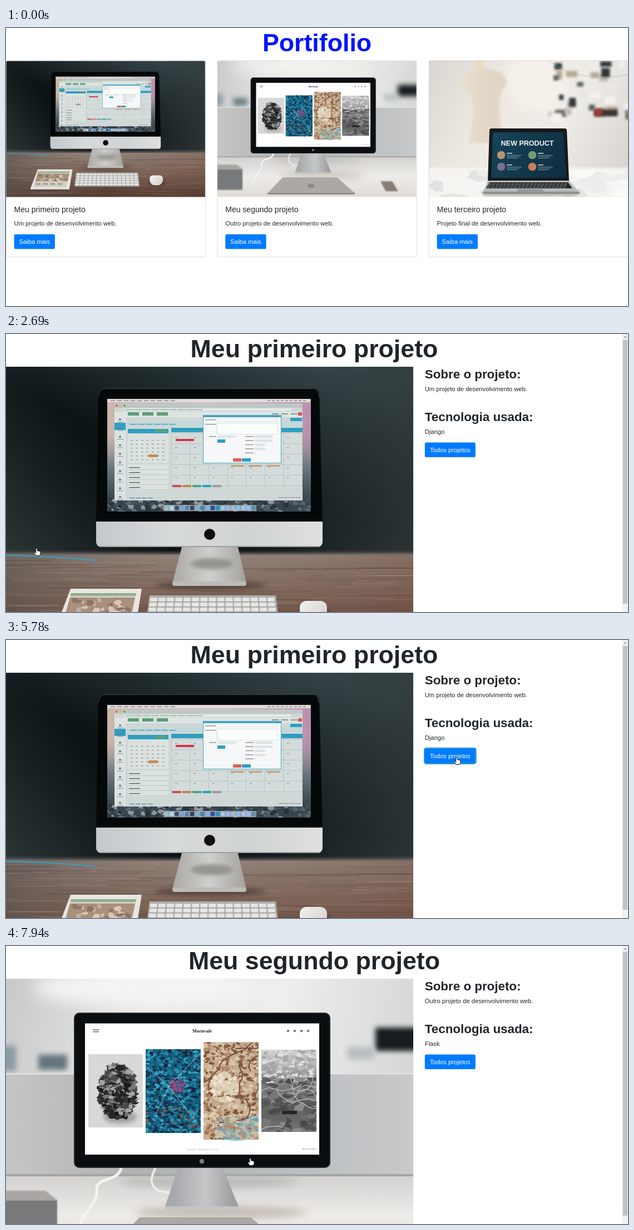
Recreate the animation shown at these times as an HTML page with a canvas. Size 1118 px wide and 501 px high, loop 8 s.

```html
<!DOCTYPE html>
<html lang="pt">
<head>
<meta charset="utf-8">
<title>Portifolio</title>
<style>
html, body { margin: 0; width: 100%; height: 100%; overflow: hidden; background: #fff; }
canvas { display: block; width: 100vw; height: 100vh; }
</style>
</head>
<body>
<canvas id="stage" width="1118" height="501"></canvas>
<script>
const W = 1118, H = 501, LOOP = 8000;
const SX = 0.69875, SY = 0.6955; // page pixels to stage pixels
const SANS = '"Liberation Sans", Arial, sans-serif';
const SERIF = '"Liberation Serif", Times, serif';
const INK = '#212529', BLUE = '#007bff', TEAL = '#2f9fc0';
const stage = document.getElementById('stage').getContext('2d');
let g = stage;

// ---- drawing helpers ----
function rect(x, y, w, h, c) { g.fillStyle = c; g.fillRect(x, y, w, h); }
function round(x, y, w, h, r, c) {
  g.beginPath(); g.roundRect(x, y, w, h, r); g.fillStyle = c; g.fill();
}
function oval(x, y, rx, ry, c) {
  g.beginPath(); g.ellipse(x, y, rx, ry, 0, 0, 7); g.fillStyle = c; g.fill();
}
// four-sided shape with a level top and bottom edge
function slab(x0, y0, w0, x1, y1, w1, c) {
  g.beginPath();
  g.moveTo(x0, y0); g.lineTo(x0 + w0, y0); g.lineTo(x1 + w1, y1); g.lineTo(x1, y1);
  g.closePath(); g.fillStyle = c; g.fill();
}
function curve(d, c, w) { g.strokeStyle = c; g.lineWidth = w; g.stroke(new Path2D(d)); }
function grad(x0, y0, x1, y1, ...colors) {
  const f = g.createLinearGradient(x0, y0, x1, y1);
  colors.forEach((c, i) => f.addColorStop(i / (colors.length - 1), c));
  return f;
}
function text(s, x, y, size, { color = INK, bold = false, align = 'left', font = SANS } = {}) {
  g.save();
  g.translate(x, y); g.scale(SX, SY);
  g.font = `${bold ? 'bold ' : ''}${size}px ${font}`;
  g.textAlign = align; g.fillStyle = color; g.fillText(s, 0, 0);
  g.restore();
}
function random(seed) {
  return () => (seed = seed * 16807 % 2147483647) / 2147483647;
}
function soft(px, draw) {
  g.save(); g.filter = `blur(${px}px)`; draw(); g.restore();
}
function clipped(x, y, w, h, draw) {
  g.save(); g.beginPath(); g.rect(x, y, w, h); g.clip(); draw(); g.restore();
}
function dashes(x, y, n, w, gap, c, h = 1.2) {
  for (let i = 0; i < n; i++) rect(x + i * (w + gap), y, w, h, c);
}
// scattered angular flakes inside an ellipse or a box
function flakes(x, y, w, h, colors, n, size, seed, oval = false) {
  const r = random(seed);
  clipped(x, y, w, h, () => {
    for (let i = 0; i < n; i++) {
      const a = r() * 6.28, d = Math.sqrt(r());
      const cx = oval ? x + w / 2 * (1 + d * Math.cos(a) * 0.85) : x + r() * w;
      const cy = oval ? y + h / 2 * (1 + d * Math.sin(a) * 0.85) : y + r() * h;
      g.beginPath();
      for (let k = 0; k < 6; k++) {
        const len = size * (0.2 + r());
        g.lineTo(cx + Math.cos(k * 1.05) * len, cy + Math.sin(k * 1.05) * len * 0.7);
      }
      g.fillStyle = colors[Math.floor(r() * colors.length)]; g.fill();
    }
  });
}
// wandering veins across a box
function veins(x, y, w, h, color, n, width, seed) {
  const r = random(seed);
  clipped(x, y, w, h, () => {
    for (let i = 0; i < n; i++) {
      let a = r() * 6.28, px = x + r() * w, py = y + r() * h;
      g.beginPath(); g.moveTo(px, py);
      for (let k = 0; k < 14; k++) {
        a += (r() - 0.5) * 1.3;
        g.lineTo(px += Math.cos(a) * 9, py += Math.sin(a) * 9);
      }
      g.strokeStyle = color; g.lineWidth = width; g.stroke();
    }
  });
}

// ---- first photo: dark room, calendar on the screen ----
function monthGrid(x, y, cols, rows, dx, dy, c) {
  for (let j = 0; j < rows; j++) dashes(x, y + j * dy, cols, 3.5, dx - 3.5, c);
}
function dialog() {
  rect(354, 146, 141, 87, '#45a5bf');
  rect(355, 150, 139, 82, '#f5f7f8');
  for (const [y, h] of [[152, 5], [160, 21]]) {
    rect(379, y, 109, h, '#cdd6d8'); rect(380, y + 0.7, 107.5, h - 1.4, '#fbfcfc');
    rect(358, y + 2, 19, 1.3, '#888');
  }
  rect(365, 184, 13, 1.3, '#888'); rect(381, 183, 32, 4, '#dfe5e7');
  rect(380, 190, 14, 6, TEAL);
  for (let j = 0; j < 5; j++) {
    rect(430, 184 + j * 7.4, 15, 1.3, '#888');
    rect(447, 183 + j * 7.4, j < 2 ? 32 : j < 4 ? 19 : 2, 4, '#dbe2e4');
  }
  rect(408, 224, 15, 6, '#d9605a'); rect(424, 224, 16, 6, TEAL);
}
function calendarApp() {
  rect(182, 117, 366, 203, grad(182, 140, 548, 120, '#c9b7ab', '#cfc4bf', '#b98fb0'));
  rect(182, 180, 366, 140, grad(0, 180, 0, 300, '#8d8b8d00', '#6b7780', '#38434b'));
  flakes(182, 296, 366, 24, ['#2a343c', '#586670', '#44525c', '#8c969b'], 160, 7, 41);
  rect(182, 117, 365, 6, '#e3dadc');
  dashes(188, 119.5, 10, 8, 4, '#777');
  dashes(470, 119.5, 9, 5, 3, '#777');

  rect(195, 125, 338, 175, '#cfd8d6');
  rect(195, 125, 338, 8, '#bfc7c6');
  ['#e2544b', '#e3b23c', '#53b04a'].forEach((c, i) => oval(199 + i * 7, 129, 2, 2, c));
  rect(213, 134, 300, 4.5, '#e3e9e7');
  dashes(215, 135.7, 9, 14, 1.5, '#7fa487');
  rect(195, 140, 338, 10, '#dde4e1');
  dashes(219, 141, 3, 20, 6, '#5c9c7a', 6);
  dashes(478, 143, 3, 12, 5, '#8a9794', 2);
  rect(525, 141, 7, 6, '#d2574f');
  rect(195, 150, 20, 149, '#dbe2e0');
  rect(195, 160, 20, 13, TEAL);
  for (let y = 154; y < 295; y += 15.5) {
    oval(205, y, 2, 2, '#6c7b80'); rect(200, y + 4, 11, 1, '#8b9799');
  }
  rect(218, 158, 314, 8, '#c2d8dc');
  dashes(223, 162, 6, 12, 2, '#3f90aa');
  rect(511, 151, 21, 6, TEAL);

  rect(219, 171, 73, 8, TEAL);
  rect(268, 172, 20, 5, '#57a37a');
  rect(219, 179, 73, 53, '#dbe2df');
  rect(219, 235, 73, 47, '#dbe2df');
  monthGrid(224, 191, 7, 6, 9.5, 7, '#82908f');
  rect(256, 217, 17, 5, '#c98a55');
  for (let y = 240; y < 282; y += 9) {
    rect(221, y, 20, 1.3, '#4d5a5c'); rect(219, y + 4, 73, 0.7, '#b3bfbe');
  }
  rect(297, 169, 236, 8, TEAL);
  rect(297, 178, 236, 98, '#d3dcda');
  dashes(297, 178, 8, 0.8, 32.8, '#b3bfbe', 98);
  for (let y = 178; y < 277; y += 19) rect(297, y, 236, 0.8, '#b3bfbe');
  monthGrid(304, 186, 7, 5, 33.5, 18, '#87908f');
  rect(305, 189, 33, 4, '#d5334f');
  dashes(404, 236.5, 3, 24, 8, '#c09a70', 2.5);
  ['#d2475a', '#c9824a', '#4aa68c', TEAL, '#989d9e']
    .forEach((c, i) => rect(299 + i * 18, 272, 16, 4, c));
  dashes(222, 295, 4, 9, 2, '#4c7f92');
  dashes(490, 294, 4, 9, 1, '#8a9495');
  dialog();

  rect(283, 308, 167, 11, '#aab5bccc');
  const r = random(9);
  for (let x = 285; x < 445; x += 9.2)
    round(x, 309.5, 7.4, 8, 1.5, `hsl(${190 + r() * 40} ${20 + r() * 50}% ${25 + r() * 55}%)`);
}
function wall() {
  rect(0, 59, 732, 350, grad(440, 10, 310, 350, '#364447', '#212c2f', '#0d1416', '#0b1113'));
  rect(0, 59, 732, 350, grad(440, 250, 760, 420, '#2d353600', '#303839'));
  rect(0, 59, 732, 350, grad(0, 400, 190, 250, '#2c3536', '#2c353600'));
}
function desk() {
  soft(3, () => slab(-10, 395, 752, -10, 570, 752, '#877a73'));
  rect(0, 398, 732, 163, grad(0, 398, 0, 561, '#918279', '#7b6054', '#4c332b'));
  rect(0, 398, 732, 163, grad(0, 0, 732, 0, '#55504d99', '#8b726500', '#6d4c4066'));
  const r = random(17);
  for (let i = 0; i < 130; i++)
    rect(r() * 732 - 60, 402 + r() * 158, 60 + r() * 170, 0.7 + r() * 1.3,
      r() < 0.55 ? '#b9a19133' : '#3b241c33');
  curve('M0 399 Q80 400 162 408', '#36a0c8', 2);
}
function tablet() {
  slab(116, 459, 128, 88, 533, 144, '#e9e5e0');
  slab(117, 467, 117, 100, 525, 122, '#d3d0c7');
  slab(117, 467, 117, 115.5, 472, 118, '#8fb08d');
  slab(115, 475, 117, 107, 503, 119, '#a8907c');
  flakes(114, 475, 110, 28, ['#d8c8b5', '#8d7565', '#c2b09e'], 22, 9, 6);
  dashes(108, 510, 4, 18, 9, '#a9988a', 6);
}
function keyboard() {
  slab(258, 471, 227, 251, 522, 240, '#adacaa');
  for (let j = 0; j < 5; j++) {
    const step = (226 + j * 2.2) / 15;
    for (let i = 0; i < 15; i++)
      round(259 - j * 1.2 + i * step, 475 + j * 9, step - 2.2, 6.8, 1.5, '#e6e6e4');
  }
}
function photoDark() {
  wall();
  desk();
  soft(5, () => oval(368, 453, 100, 6, '#2a1d1999'));
  slab(316, 384, 101, 299, 449, 133, grad(300, 0, 432, 0, '#aaa9a6', '#cfcfcd', '#a3a19e'));
  round(299, 446, 133, 8, 4, '#bdbbb8');
  soft(3, () => oval(370, 414, 38, 10, '#96948f'));
  slab(166, 104, 397, 162, 342, 407, '#050809');
  round(166, 98, 397, 30, 10, '#050809');
  curve('M167 112 Q167 99 176 98.5 H552 Q562 99 562.5 113', '#3b4649', 1.2);
  calendarApp();
  round(162, 338, 407, 46, [0, 0, 9, 9], grad(162, 0, 569, 0, '#c3c8ca', '#d7dadb', '#cfd3d4', '#dfe0e0'));
  rect(168, 382, 395, 2, '#9ca0a2');
  oval(366, 361, 10, 10, '#0c0d0e');
  soft(4, () => slab(96, 530, 134, 240, 530, 260, '#1d110e66'));
  tablet();
  keyboard();
  soft(3, () => oval(555, 506, 28, 16, '#1d110e77'));
  round(528, 481, 49, 37, [12, 12, 20, 20], grad(528, 480, 560, 518, '#f3f2f0', '#d7d4d1'));
}

// ---- second photo: bright office, stone gallery on the screen ----
function gallery() {
  rect(148, 195, 98, 132, '#d8d8d8');
  soft(3, () => oval(205, 308, 30, 12, '#a2a2a2'));
  flakes(163, 204, 76, 116, ['#1a1a1a', '#333', '#4b4b4b', '#777', '#262626', '#a5a5a5'], 420, 8, 5, true);

  rect(251, 186, 99, 151, '#155e7c');
  flakes(251, 186, 99, 151, ['#123249', '#2691b4', '#0d4867', '#1f7699', '#1a2540', '#35a6c4'], 700, 5, 23);
  flakes(291, 236, 36, 30, ['#7b4d8c', '#a04e78', '#4d4c7a'], 70, 4, 3, true);
  flakes(251, 290, 99, 46, ['#895b47', '#303153', '#197293'], 50, 4, 8);
  curve('M252 217 L292 252 L350 328 M350 193 L294 250 L270 302', '#a2c2cb', 1);

  rect(355, 173, 99, 176, '#c4ab8f');
  flakes(355, 173, 99, 176, ['#dccdb4', '#93694e', '#b58b6b', '#d9c4a6', '#80563e', '#cdb89d'], 620, 6, 57);
  flakes(365, 222, 56, 64, ['#eee5d2', '#dfd3bd', '#d9c9af'], 110, 6, 7, true);
  flakes(376, 306, 78, 43, ['#8bb0b5', '#a69985', '#739faa', '#cbbda2'], 120, 6, 31);
  curve('M454 307 Q416 315 432 334 T401 349', '#9bc4cc', 3);
  veins(355, 173, 99, 176, '#754a37', 5, 2, 12);

  rect(459, 187, 99, 148, grad(0, 187, 0, 335, '#d5d5d5', '#8e8e8e', '#555', '#777'));
  flakes(459, 187, 99, 60, ['#d2d2d2', '#bbb', '#a5a5a5', '#e0e0e0'], 180, 6, 2);
  flakes(459, 237, 99, 98, ['#555', '#777', '#4a4a4a', '#8a8a8a', '#666'], 90, 12, 77);
  veins(459, 225, 99, 110, '#bdbdbd', 8, 1.3, 19);
  rect(496, 297, 27, 6, '#252525');
}
function office() {
  rect(0, 59, 732, 175, grad(0, 59, 732, 190, '#c8c9ca', '#e9e9e8', '#eeeeec', '#d6d7d7'));
  soft(14, () => oval(250, 75, 200, 34, '#f4f3f2'));
  soft(5, () => {
    rect(-8, 180, 26, 45, '#8c9aa1'); rect(58, 196, 52, 27, '#65757d');
    rect(664, 147, 80, 42, '#171c20'); rect(614, 182, 48, 22, '#b9bfc1');
  });
  rect(0, 231, 732, 186, grad(0, 0, 732, 0, '#c5c5c4', '#b1b2b2', '#b9bdbf', '#c7c9ca'));
  rect(0, 229, 732, 2.5, '#e1e2e2');
  rect(0, 411, 732, 150, grad(0, 411, 0, 561, '#d1d0ce', '#eeece8', '#dedbd5'));
  rect(0, 411, 732, 4, '#a3a4a4');
  soft(7, () => { oval(386, 480, 155, 12, '#c5beb7'); oval(365, 425, 160, 9, '#b6b6b4'); });
  soft(1.2, () => {
    slab(-9, 441, 80, -9, 458, 101, '#a9a6a3');
    slab(-9, 458, 101, -9, 535, 101, '#77797a');
    slab(600, 503, 44, 620, 540, 45, '#877d75');
  });
}
function photoBright() {
  office();
  curve('M207 400 C202 426 160 416 163 440 S138 480 130 510', '#f4f3f0', 5);
  curve('M269 400 C254 426 263 443 292 444 S353 440 353 400', '#eeedeb', 4);
  slab(310, 398, 79, 285, 472, 134, grad(300, 0, 417, 0, '#a6a9ab', '#c6c7c8', '#969899'));
  round(285, 469, 134, 7, 3, '#c4c4c3');
  slab(240, 489, 200, 184, 547, 322, '#aba8a6');
  rect(184, 546, 322, 6, '#8f8c8a');
  oval(344, 520, 13, 8, '#8c8987');
  round(122, 120, 461, 280, 10, '#0b0e10');
  g.strokeStyle = '#41484b'; g.lineWidth = 1;
  g.beginPath(); g.roundRect(123, 121, 459, 278, 9); g.stroke();
  rect(142, 139.5, 421, 236.5, '#fff');
  dashes(156, 150.5, 1, 11, 0, '#444'); dashes(156, 154, 1, 11, 0, '#444');
  text('Mornvale', 352.5, 156, 12, { bold: true, align: 'center', font: SERIF });
  for (let x = 507; x < 545; x += 12) oval(x, 153, 2.2, 2.2, '#777');
  gallery();
  text('Copyright © All rights reserved', 352, 368, 6.2, { color: '#aaa', align: 'center' });
  text('Stone Format', 545, 367, 6, { color: '#777', align: 'center' });
  oval(352, 388, 4.2, 4.2, '#777d80');
}

// ---- third photo: workshop with a laptop, drawn at card size ----
function mannequin() {
  soft(2, () => {
    const c = grad(815, 0, 900, 0, '#e9e0d3', '#e3d7c6', '#dfd4c5');
    rect(842, 59, 16, 24, '#e9dcc0');
    slab(826, 80, 66, 842, 152, 44, c);
    oval(858, 98, 41, 24, c);
    slab(842, 150, 44, 831, 207, 62, c);
  });
}
function pinboard() {
  const r = random(83), tones = ['#c4bbb1', '#b7a795', '#e9e7e4', '#59605f', '#f4f1ed', '#2f383d'];
  soft(2.2, () => {
    for (let i = 0; i < 30; i++)
      rect(975 + r() * 143, 60 + r() * 100, 7 + r() * 15, 7 + r() * 11, tones[i % 6]);
    rect(1057, 147, 42, 12, '#3b3432'); rect(1058, 146, 13, 12, '#a63b32');
  });
}
function laptop() {
  soft(2, () => slab(853, 295, 179, 860, 303, 162, '#b9b5b0'));
  slab(869, 184, 139, 866, 276, 146, '#15191b');
  round(869, 181, 139, 12, 4, '#15191b');
  slab(875, 188, 127, 872, 270, 135, grad(875, 188, 1007, 270, '#154459', '#0d2d3e'));
  text('NEW PRODUCT', 937, 212, 18, { color: '#f2f5f5', bold: true, align: 'center' });
  ['#ba936e', '#719d72', '#777097', '#c98059'].forEach((c, i) => {
    const x = 890 + i % 2 * 56, y = 229 + (i >> 1) * 21;
    oval(x, y, 7.3, 7.3, c);
    rect(x + 10, y - 4, 10, 1.5, '#d4dfe1');
    for (let k = 0; k < 3; k++) rect(x + 10, y + k * 2.6, 27 - k * 4, 0.8, '#8ea9b3');
  });
  slab(866, 275, 146, 857, 296, 174, '#b8bbbb');
  slab(869, 278, 141, 863, 289, 155, '#25292a');
  for (let j = 0; j < 4; j++) dashes(868 - j, 279.5 + j * 2.5, 21, 5, 1.8, '#818788', 1);
  slab(920, 290, 44, 918, 296, 50, '#999c9c');
  round(857, 295, 174, 4, 2, '#8d9090');
}
function photoLaptop() {
  rect(760, 59, 358, 246, grad(760, 59, 1118, 250, '#d9d6d1', '#eee9e2', '#eeece8', '#d8d4d0'));
  soft(10, () => oval(955, 95, 55, 55, '#f5f1ea'));
  mannequin();
  pinboard();
  curve('M975 59 Q1034 101 1118 84', '#b7b0a7', 0.7);
  soft(2, () => rect(750, 252, 380, 60, '#f5f4f1'));
  flakes(760, 256, 358, 48, ['#eceeed', '#f9f9f7', '#e3e4e1'], 26, 26, 14);
  laptop();
}

// ---- pages ----
const BTN1 = { x: 14.6, y: 371.8, w: 73.3 };
const BTN2 = { ...BTN1, x: 394.3 };
const BTN_ALL = { x: 752.8, y: 195.6, w: 91 };
const BTN_H = 38 * SY;

function button(label, { x, y, w }) {
  round(x, y, w, BTN_H, 2.8, BLUE);
  text(label, x + w / 2, y + 17.1, 16, { color: '#fff', align: 'center' });
}
function card(x, title, line, photo) {
  g.save();
  g.beginPath(); g.roundRect(x + 0.5, 59, 357.5, 245.5, [2.5, 2.5, 0, 0]); g.clip();
  if (photo !== photoLaptop) {
    g.translate(x + 0.5, 59.5); g.scale(0.488, 0.488); g.translate(0, -59);
  }
  photo();
  g.restore();
  g.strokeStyle = 'rgba(0,0,0,.14)'; g.lineWidth = 0.9;
  g.beginPath(); g.roundRect(x + 0.4, 59, 358, 353.7, 2.8); g.stroke();
  text(title, x + 14.6, 332, 20);
  text(line, x + 14.6, 356, 16);
  button('Saiba mais', { ...BTN1, x: x + BTN1.x });
}
function home() {
  text('Portifolio', 559, 42.1, 64, { color: '#0014ff', bold: true, align: 'center' });
  card(0, 'Meu primeiro projeto', 'Um projeto de desenvolvimento web.', photoDark);
  card(379.7, 'Meu segundo projeto', 'Outro projeto de desenvolvimento web.', photoBright);
  card(760, 'Meu terceiro projeto', 'Projeto final de desenvolvimento web.', photoLaptop);
}
function project(title, line, tech, photo) {
  const x = BTN_ALL.x;
  text(title, 554, 42.1, 64, { bold: true, align: 'center' });
  clipped(0, 58.7, 732, 443, photo);
  text('Sobre o projeto:', x, 80, 32, { bold: true });
  text(line, x, 103.3, 16);
  text('Tecnologia usada:', x, 156.8, 32, { bold: true });
  text(tech, x, 180, 16);
  button('Todos projetos', BTN_ALL);
  rect(1107.5, 0, 10.5, H, '#f1f1f1');
  rect(1108.7, 10.5, 8.4, 475.5, '#c1c1c1');
  slab(1113, 3.5, 0, 1110.5, 6.5, 5, '#8a8a8a');
}
function page(draw) {
  const c = document.createElement('canvas');
  c.width = W; c.height = H;
  g = c.getContext('2d');
  rect(0, 0, W, H, '#fff');
  draw();
  g = stage;
  return c;
}
const homePage = page(home);
const firstPage = page(() => project('Meu primeiro projeto', 'Um projeto de desenvolvimento web.', 'Django', photoDark));
const secondPage = page(() => project('Meu segundo projeto', 'Outro projeto de desenvolvimento web.', 'Flask', photoBright));

// ---- pointer ----
const ARROW = new Path2D('M0 0 V12.5 L2.9 9.8 L5.1 14.5 L7.3 13.5 L5.2 8.9 H9Z');
const HAND = new Path2D('M-1.3 1 Q0 -1 1.3 1 V5 Q2.8 4.2 3.7 5.3 Q5 4.7 5.6 6 Q7 5.8 7 7.3 V10 L5.5 13.5 H-1 L-4.3 8.8 Q-4.6 7.2 -3 7.3 L-1.3 8.7Z');
// each move bends from one point past a second to a third; the button reached is clicked
const MOVES = [
  { start: 720, end: 1330, pts: [[109, 346], [-20, 385], [55, 386]], pow: 1, box: BTN1, click: 2140, leave: 2690 },
  { start: 3150, end: 3950, pts: [[55, 386], [101, 389], [554, 134]], pow: 1.5 },
  { start: 3990, end: 4780, pts: [[554, 134], [916, 205], [810, 211]], pow: 0.8, box: BTN_ALL, click: 5470, leave: 6170 },
  { start: 6410, end: 7160, pts: [[810, 211], [263, 453], [439, 382]], pow: 1, box: BTN2, click: 7460, leave: 7940 }
];
function inside(x, y, b) {
  return b && x >= b.x && x <= b.x + b.w && y >= b.y && y <= b.y + BTN_H;
}
function pointer(t, { start, end, pts, pow, box }) {
  const s = Math.min(1, (t - start) / (end - start)) ** pow;
  const [x, y] = [0, 1].map(i => Math.round(
    pts[0][i] * (1 - s) ** 2 + 2 * pts[1][i] * s * (1 - s) + pts[2][i] * s * s));
  const hand = inside(x, y, box), shape = hand ? HAND : ARROW;
  g.save();
  g.translate(x, y);
  g.fillStyle = hand ? '#fff' : '#111';
  g.strokeStyle = hand ? '#111' : '#fff';
  g.lineWidth = 1; g.lineJoin = 'round';
  g.fill(shape); g.stroke(shape);
  g.restore();
}
function focusRing(t, { box, click, leave }) {
  if (!box || t < click || t >= leave) return;
  g.globalAlpha = Math.min(1, (t - click + 40) / 150);
  g.strokeStyle = '#2f96bf'; g.lineWidth = 2.1;
  g.beginPath(); g.roundRect(box.x - 0.8, box.y - 0.8, box.w + 1.6, BTN_H + 1.6, 3.6); g.stroke();
  g.globalAlpha = 1;
}

function frame(now) {
  const t = now % LOOP;
  const view = t >= 7940 ? secondPage : t >= 2690 && t < 6170 ? firstPage : homePage;
  g.drawImage(view, 0, 0);
  const move = MOVES.findLast(m => t >= m.start);
  if (move) {
    focusRing(t, move);
    pointer(t, move);
  }
  requestAnimationFrame(frame);
}
requestAnimationFrame(frame);
</script>
</body>
</html>
```
